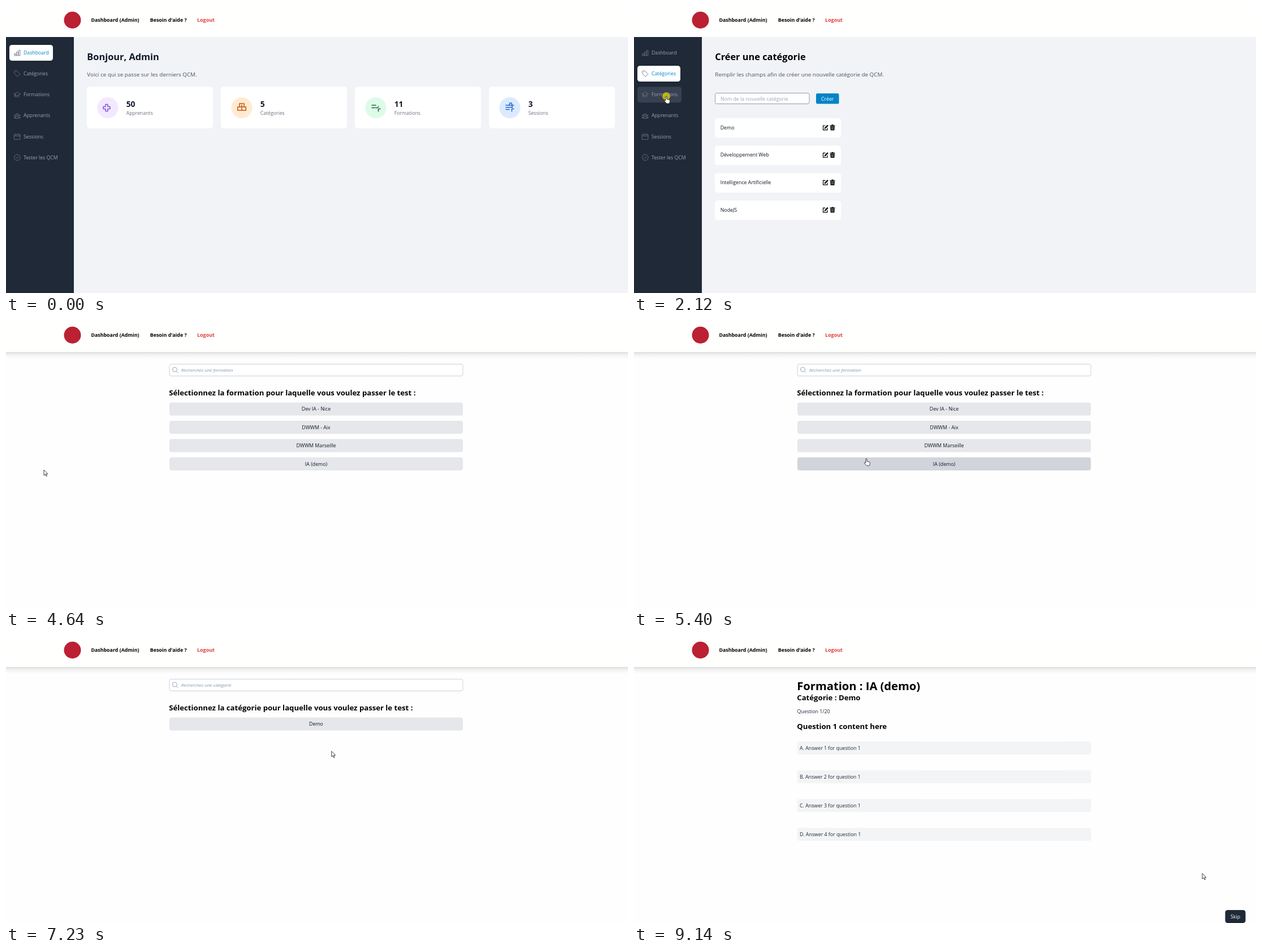
Write an HTML page that moves like this. It is 1100 by 509 pixels and loops after 9.21 s.

```html
<!DOCTYPE html>
<html lang="fr">
<head>
<meta charset="utf-8">
<title>QCM</title>
<style>
  html, body { margin: 0; width: 100%; height: 100%; overflow: hidden; background: #fff; }
  svg { display: block; width: 100%; height: 100%; }
  text { font: 8.8px "Open Sans", "Noto Sans", sans-serif; white-space: pre; }
  .bold { font-weight: 700; }
  .italic { font-style: italic; }
  .mid { text-anchor: middle; }
  .raised { filter: drop-shadow(0 .5px .6px #0002); }
  .icon { fill: none; stroke-linecap: round; stroke-linejoin: round; }
</style>
</head>
<body>
<svg id="stage" viewBox="0 0 1100 509"></svg>
<script>
const LOOP = 9210;
const INK = '#111827', GREY = '#6b7280', PALE = '#9ca3af', BLUE = '#0284c7', NAVY = '#1f2937';

const text = (x, y, s, size = 8.8, fill = INK, cls = '') =>
  `<text x="${x}" y="${y}" fill="${fill}" class="${cls}" style="font-size:${size}px">${s}</text>`;
const box = (x, y, w, h, fill, r = 4, more = '') =>
  `<rect x="${x}" y="${y}" width="${w}" height="${h}" rx="${r}" fill="${fill}" ${more}/>`;
const line = (d, stroke, width, place = '') =>
  `<path class="icon" d="${d}" stroke="${stroke}" stroke-width="${width}" transform="${place}"/>`;
const span = (from, to, body) => `<g data-from="${from}" data-to="${to}">${body}</g>`;

// Page pieces
const heading = (title, sub, fill = '#000') =>
  text(143.3, 96, title, 16.35, fill, 'bold') + text(143.3, 125.2, sub, 9.85, '#4b5563');
const card = (x, y, w, h, cls = '') => box(x, y, w, h, '#fff', 4.5, `class="${cls}"`);
const field = (y, label, w = 222, h = 19) =>
  box(143.5, y, w, h, '#fff', 3, 'stroke="#8b929e" stroke-width=".9"') + text(153, y + 13, label, 8.8, PALE);
const select = (y, label) =>
  field(y, '', 222, 18.5) + text(155, y + 12.8, label) + line(`M357.5 ${y + 8}l2.5 2.8 2.5-2.8`, '#111', 1.3);
const button = (x, y, w, label) =>
  box(x, y, w, 18.5, BLUE, 2.5) + text(x + w / 2, y + 12.5, label, 8.8, '#fff', 'mid');
const tools = (x, y) => `<g transform="translate(${x} ${y})">`
  + line('M-.5-3.5H-4V4.3H3.5V1', '#000', 1.2)
  + `<path d="M-2 2.5l.5-2.2L3.5-4.8l1.7 1.7L.2 2z"/></g>`
  + `<g transform="translate(351 ${y})"><path d="M-4.5-4h2.7l.6-1.2h2.4l.6 1.2h2.7v1.3h-9z`
  + `M-3.8-2.2h7.6L3.3 5h-6.6z"/>${line('M-1.4-.8v4.2M0-.8v4.2M1.4-.8v4.2', '#fff', .5)}</g>`;
const rows = (top, names) => names.map((name, i) => {
  const y = top + i * 48.7;
  return card(143, y, 223, 34.5) + text(152.7, y + 19.7, name) + tools(338.5, y + 16.5);
}).join('');

// Dashboard
const stats = [
  ['50', 'Apprenants', '#f3e8ff', '#7e56d9', 'M-4-6h4v4h4v4h-4v4h-4v-4h-4v-4h4z'],
  ['5', 'Catégories', '#ffebd3', '#c4560f', 'M-4-1.5v-6h8v6M-7.3-1.5h14.6v6H-7.3zM0-5v9.5'],
  ['11', 'Formations', '#dcfce7', '#25604d', 'M-7-4.5h7M-7 0h4.5M-1 0h4l2-2M8 2H4.5v4.5'],
  ['3', 'Sessions', '#dbeafe', '#2563d4', 'M-7-4.5h14M-7-.7h12M-7 3h6M-1-4.5l1-4h3l1 4v4M7 2H3.5v4.5']
];
const dashboard = heading('Bonjour, Admin', 'Voici ce qui se passe sur les derniers QCM.', INK)
  + stats.map(([count, label, tint, ink, d], i) => {
    const x = 143 + i * 237;
    return card(x, 143, 223, 74, 'raised') + `<circle cx="${x + 37}" cy="180.5" r="18.6" fill="${tint}"/>`
      + line(d, ink, 1.5, `translate(${x + 37} 180.5)`)
      + text(x + 69.7, 179, count, 13.8, INK, 'bold') + text(x + 69.7, 193, label, 8.7, GREY);
  }).join('');

// Management pages
const creation = (kind, names) =>
  heading(`Créer une ${kind}`, `Remplir les champs afin de créer une nouvelle ${kind} de QCM.`)
  + field(154.5, `Nom de la nouvelle ${kind}`, 166.5) + button(322, 155, 40.5, 'Créer') + rows(199, names);

const courses = ['Dev IA - Nice', 'DWWM - Aix', 'DWWM Marseille', 'IA (demo)'];
const members = [['regie@orvel.test', 'admin'], ['tuteur@orvel.test', 'trainer'],
  ['inscrit@orvel.test', 'candidat'], ['inscrit1@orvel.test', 'candidat'], ['inscrit2@orvel.test', 'candidat']];

const manage = kind => heading(`Gérer les ${kind}`, `Ajouter, modifier ou supprimer des ${kind}.`);
const userForm = manage('utilisateurs') + field(143.5, "Nom d'utilisateur") + field(172.5, 'Mot de passe')
  + select(201.5, 'Candidat') + button(143, 229.6, 223, 'Ajouter');
const userList = members.map(([mail, role], i) => {
  const y = 262 + i * 58;
  return card(143, y, 223, 44.3) + text(152.7, y + 20, mail) + text(152.7, y + 32, role, 7.4, GREY)
    + tools(334, y + 22.3);
}).join('');
const sessionForm = manage('sessions') + field(143.5, 'Nom de la session')
  + select(172.5, 'Dev IA - Nice') + button(143, 201.5, 223, 'Ajouter');

// Test pages
const ROW_TOP = 144.5, ROW_STEP = 32.4;
const chooser = (kind, names) => box(289, 76.5, 519, 21, '#fff', 3, 'stroke="#cbd2dc"')
  + line('M302.5 86a4 4 0 1 0-8 0 4 4 0 0 0 8 0M301.5 89.2l2.5 2.5', '#94a3b8', 1)
  + text(309.7, 90, `Recherchez une ${kind}`, 8, '#8294ab', 'italic')
  + text(288.3, 131.7, `Sélectionnez la ${kind} pour laquelle vous voulez passer le test :`, 13.15, '#000', 'bold')
  + names.map((name, i) => {
    const y = ROW_TOP + i * ROW_STEP;
    return box(289, y, 519, 23.2, '#e5e7eb', 4, `data-row="${i}"`) + text(548.5, y + 14.8, name, 8.8, INK, 'mid');
  }).join('');
const quizHead = text(288.3, 96.3, 'Formation : IA (demo)', 20.15, '#000', 'bold')
  + text(288.3, 114.3, 'Catégorie : Demo', 13.15, '#000', 'bold');
const question = text(288.5, 137.3, 'Question 1/20', 8.8, NAVY)
  + text(288.3, 165, 'Question 1 content here', 13.15, '#000', 'bold')
  + [...'ABCD'].map((letter, i) => {
    const y = 187.3 + i * 51;
    return box(288.5, y, 520, 23, '#f3f4f6') + text(293, y + 14.9, `${letter}. Answer ${i + 1} for question 1`, 8.8, NAVY);
  }).join('')
  + box(1045.5, 486, 36, 23, NAVY, 4.5) + text(1063.5, 500.8, 'Skip', 8.8, '#fff', 'mid');

// Sidebar
const PAGE_STARTS = [0, 1390, 2250, 3040, 3770], TEST_START = 4390;
const ITEM_STEP = 37.1;
const menu = [
  ['Dashboard', 77, 'M2 21v-6h5v6zM9.5 21V9h5v12zM17 21V3h5v18z'],
  ['Catégories', 76, 'M2 4v7l11 11 9-9L11 2H4zM6.5 6.5h.1'],
  ['Formations', 78, 'M1 9l11-6 11 6-11 6zM6 12v6q6 5 12 0v-6M3 10v9'],
  ['Apprenants', 80, 'M8.5 8a3.5 3.5 0 1 0 7 0 3.5 3.5 0 0 0-7 0M6 21c0-9 12-9 12 0zM2 11a2.2 2.2 0 1 0 4.4 0 2.2 2.2 0 0 0-4.4 0M17.6 11a2.2 2.2 0 1 0 4.4 0 2.2 2.2 0 0 0-4.4 0M6 20H1q0-5 6-4M18 20h5q0-5-6-4'],
  ['Sessions', 67, 'M2 5h20v17H2zM2 10h20M7 2v4M17 2v4'],
  ['Tester les QCM', 93, 'M12 1.5a10.5 10.5 0 1 0 0 21 10.5 10.5 0 0 0 0-21M7.5 12.5l3 3 6-7']
];
const sidebar = box(0, 55, 120, 454, NAVY, 0) + menu.map(([label, w, d], i) =>
  `<g class="item" transform="translate(0 ${i * ITEM_STEP})">${box(6, 69, w, 28, 'none', 4.5)}`
  + line(d, GREY, 1.7, 'translate(13.7 77) scale(.51)') + text(31, 86.2, label, 8.7, PALE) + '</g>').join('');

const header = box(0, 0, 1100, 55, '#fffffe', 0) + '<circle cx="117.5" cy="25" r="15" fill="#bb2033"/>'
  + text(150.4, 28.3, 'Dashboard (Admin)', 8.85, '#000', 'bold')
  + text(254.8, 28.3, "Besoin d'aide ?", 8.85, '#000', 'bold') + text(338, 28.3, 'Logout', 8.95, '#e03c3c', 'bold');

const stage = document.getElementById('stage');
stage.innerHTML = `<defs><linearGradient id="shade" x2="0" y2="1"><stop stop-color="#000" stop-opacity=".13"/>
  <stop offset=".4" stop-color="#000" stop-opacity=".05"/><stop offset="1" stop-color="#000" stop-opacity="0"/></linearGradient></defs>`
  + span(0, TEST_START, box(0, 0, 1100, 509, '#f1f3f7', 0) + sidebar)
  + span(0, 1390, dashboard)
  + span(1390, 2250, creation('catégorie', ['Demo', 'Développement Web', 'Intelligence Artificielle', 'NodeJS']))
  + span(2250, 3040, creation('formation', courses))
  + span(3040, 3770, userForm) + span(3040, 3840, userList)
  + span(3770, TEST_START, sessionForm)
  + span(3840, TEST_START, rows(258, ['Session Nice', 'Session Aix', 'Session demo']))
  + span(TEST_START, LOOP, box(0, 0, 1100, 509, '#fefefe', 0) + box(0, 55, 1100, 12, 'url(#shade)', 0))
  + span(TEST_START, 6900, chooser('formation', courses))
  + span(6900, 7700, chooser('catégorie', ['Demo']))
  + span(7700, LOOP, quizHead)
  + span(7700, 8660, text(288.5, 137.3, 'Question 1/0', 8.8, NAVY))
  + span(8660, LOOP, question)
  + header
  + `<g id="pointer"><circle id="press" r="7" fill="#d2c40c" opacity=".82"/>
  <path id="arrow" d="M0 0v9.8l2.3-2.1 1.7 3.7 1.5-.7L3.9 7.2h3z" fill="#fff" stroke="#2b2b38" stroke-width=".9"/>
  <path id="hand" d="M-1 1q1-2 2.1 0v4.2l4.3 1.1q1.3.4 1.2 1.9l-.5 2.8q-.4 2-1.6 2H1.3q-1 0-1.8-1.3l-2.7-3.5q0-1.6 1.3-1.1l.9.8z" fill="#fff" stroke="#222" stroke-width=".85"/></g>`;

const spans = [...stage.querySelectorAll('[data-from]')];
const items = [...stage.querySelectorAll('.item')];
const choices = [...stage.querySelectorAll('[data-row]')];
const [pointer, press, arrow, hand] = ['pointer', 'press', 'arrow', 'hand'].map(id => document.getElementById(id));
const show = (el, on) => { el.style.display = on ? '' : 'none'; };

// Pointer route: time, x, y
const route = [
  [110, 1040, 498], [330, 760, 180], [520, 480, 45], [680, 260, 18], [860, 90, 85], [990, 52, 127], [1050, 51, 129],
  [1450, 51, 129], [1920, 57, 160], [2320, 57, 160], [2740, 60, 197], [3100, 60, 197], [3500, 63, 234],
  [3840, 63, 234], [4110, 67, 264], [4680, 67, 264], [5120, 285, 256], [5600, 500, 235], [6090, 570, 162],
  [6160, 570, 159], [6360, 570, 159], [6430, 567, 264], [6500, 567, 264], [6560, 567, 262], [6970, 567, 262],
  [7450, 583, 156], [7770, 583, 156], [8300, 640, 308], [8590, 705, 245], [8750, 800, 80], [9000, 960, 330], [9140, 1005, 421]
];
const presses = [[1320, 1390], [2120, 2250], [2900, 3030], [3640, 3770], [4250, 4320], [6760, 6830], [7560, 7630]];

function locate(t) {
  const next = route.findIndex(p => p[0] > t);
  if (next < 1) return (next ? route[route.length - 1] : route[0]).slice(1);
  const [a, b] = [route[next - 1], route[next]], k = (t - a[0]) / (b[0] - a[0]);
  return [a[1] + (b[1] - a[1]) * k, a[2] + (b[2] - a[2]) * k];
}

function draw(now) {
  const t = now % LOOP, [x, y] = locate(t), active = t >= route[0][0];
  spans.forEach(el => show(el, t >= +el.dataset.from && t < +el.dataset.to));

  let link = false;
  const page = PAGE_STARTS.filter(start => start <= t).length - 1;
  items.forEach((item, i) => {
    const dy = y - 69 - i * ITEM_STEP;
    const over = active && t < TEST_START && x > 6 && x < 6 + menu[i][1] && dy > 0 && dy < 28;
    link = link || over;
    item.firstChild.setAttribute('fill', i === page ? '#fff' : over ? '#374151' : 'none');
    item.lastChild.setAttribute('fill', i === page ? BLUE : PALE);
  });
  choices.forEach(choice => {
    const dy = y - ROW_TOP - choice.dataset.row * ROW_STEP;
    const visible = choice.parentNode.style.display !== 'none';
    const over = visible && x > 289 && x < 808 && dy > 0 && dy < 23.2;
    link = link || over;
    choice.setAttribute('fill', over && dy < 22 ? '#d1d5db' : '#e5e7eb');
  });

  show(pointer, active);
  show(press, presses.some(([from, to]) => t >= from && t < to));
  show(hand, link);
  show(arrow, !link);
  pointer.setAttribute('transform', `translate(${x} ${y})`);
}

const start = performance.now();
function tick() {
  draw(performance.now() - start);
  requestAnimationFrame(tick);
}
tick();
</script>
</body>
</html>
```
